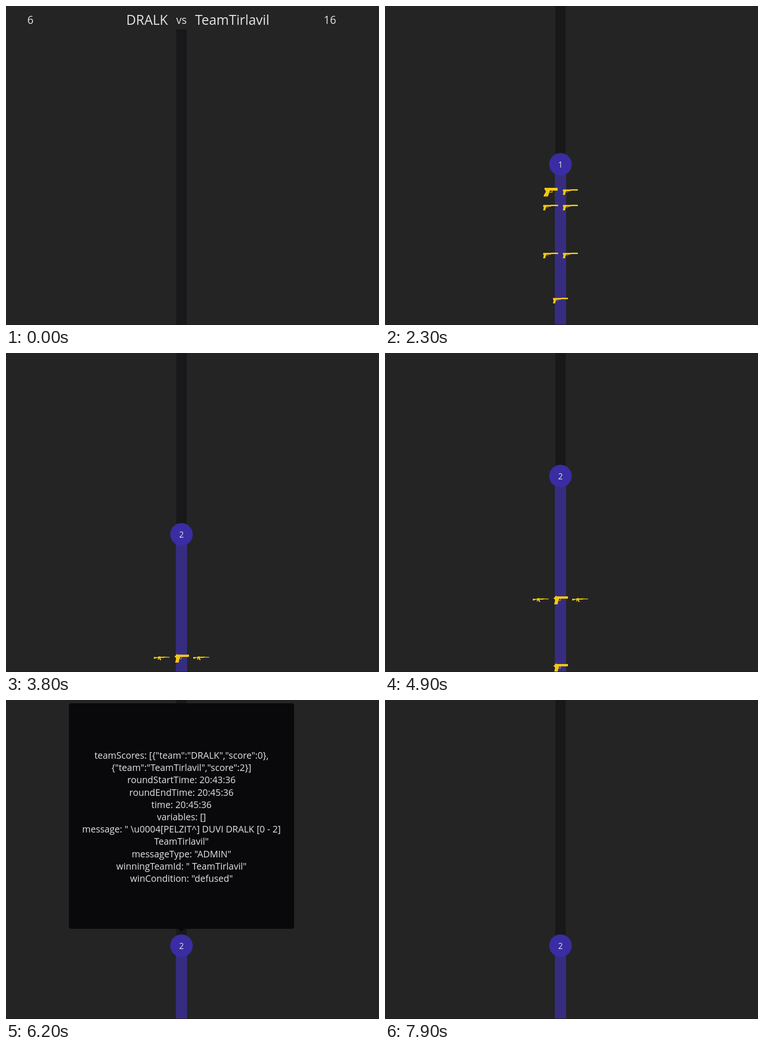
Animation of 795 by 679 pixels, one loop 8 s. Source, as an HTML page:

```html
<!DOCTYPE html>
<html lang="en">
<head>
<meta charset="utf-8">
<title>Match timeline</title>
<style>
  html, body { margin: 0; width: 100%; height: 100%; overflow: hidden; background: #242424; }
  svg { display: block; font-family: 'Open Sans', 'Noto Sans', sans-serif; fill: #e3e3e3; }
  .gun { fill: #f2c912; }
  .gun .guard { fill: none; stroke: #f2c912; }
</style>
</head>
<body>
<svg width="795" height="679" viewBox="0 0 795 679">
  <defs>
    <g id="silenced" class="gun">
      <path d="M0 1.5 1 .5H17V0H32V3H17V4H8L6 6 4.5 12H0L1.5 5 0 4Z"/>
      <path class="guard" stroke-width=".6" d="M6.5 6.3H11V4"/>
    </g>
    <g id="pistol" class="gun">
      <path d="M3 0H30.500L31 1V6H14.500L10.500 17.500 9 18.500H1.500L1 16.500 5.500 9 5.500 6 3 4Z"/>
      <path class="guard" stroke-width="1.3" d="M13.500 9.300H19.300V6"/>
    </g>
    <g id="heavy" class="gun">
      <path d="M4 1 6 0 8 1H31.500V5L30.500 6H13L11 10 9.500 18H2L4 10 3 7 0 4.500 3 3.500Z"/>
      <path class="guard" stroke-width="1" d="M11 10H15L16 6"/>
    </g>
    <g id="rifle" class="gun">
      <path d="M0 2 8 2.500 9 1.500 13 .500 14 1.500H22V.500L23 1.500 34 2V3.200H23L22 4H14L16 8.500 13.500 9 11.500 5 9.500 8 8 7.500 9.500 4.500 7 4 1 6 0 5.500Z"/>
    </g>
  </defs>
  <g id="page"></g>
  <g id="tip"></g>
  <rect y="678" width="795" height="1" fill="#1c191a"/>
</svg>
<script>
const LOOP = 8000, STEP = 100, CENTER = 374;
const HOME = 'DRALK', AWAY = 'TeamTirlavil';
const $ = id => document.getElementById(id);

// Scroll position and tooltip opacity as [time, value] points
const SCROLL = [
  [900, 0], [1000, 11], [1100, 150], [1600, 150], [1700, 297], [1800, 410], [1900, 450],
  [2100, 450], [2800, 1100], [3800, 1937], [3900, 1950], [4000, 2060], [4100, 2100],
  [4800, 2100], [4900, 2061], [5000, 1972], [5100, 1950], [5200, 1950], [5300, 1845], [5400, 1800]
];
const FADE = [[5900, 0], [6000, .2], [6100, .75], [6200, 1], [7600, 1], [7700, .8], [7800, .25], [7900, 0]];

// Round marker top, bar end and weapons as [shape, x, y]
const ROUNDS = [
  { top: 949, end: 1647, guns: [
    ['pistol', 337, 1023], ['silenced', 379, 1026],
    ['silenced', 337, 1059], ['silenced', 379, 1059],
    ['silenced', 337, 1161], ['silenced', 379, 1161],
    ['silenced', 358, 1257],
    ['pistol', 337, 1320], ['silenced', 379, 1323],
    ['pistol', 358, 1350]
  ] },
  { top: 2299, end: 3000, guns: [
    ['rifle', 315, 2582], ['heavy', 358.500, 2578], ['rifle', 399, 2582],
    ['heavy', 358.500, 2722]
  ] }
];

const DETAILS = [
  `teamScores: [{"team":"${HOME}","score":0},`,
  `{"team":"${AWAY}","score":2}]`,
  'roundStartTime: 20:43:36',
  'roundEndTime: 20:45:36',
  'time: 20:45:36',
  'variables: []',
  `message: " \\u0004[PELZIT^] DUVI ${HOME} [0 - 2]`,
  `${AWAY}"`,
  'messageType: "ADMIN"',
  `winningTeamId: " ${AWAY}"`,
  'winCondition: "defused"'
];

const text = (str, x, y, size, anchor = 'middle') =>
  `<text x="${x}" y="${y}" font-size="${size}" text-anchor="${anchor}">${str}</text>`;

const roundMarkup = ({ top, end, guns }, i) =>
  `<rect x="362" y="${top + 24}" width="24" height="${end - top - 24}" fill="#362d81"/>` +
  guns.map(([shape, x, y]) => `<use href="#${shape}" x="${x}" y="${y}"/>`).join('') +
  `<circle cx="${CENTER}" cy="${top + 24}" r="24" fill="#3a2ca3"/>` +
  text(i + 1, CENTER, top + 30.500, 17.500);

$('page').innerHTML =
  text('6', 52, 38, 23) + text('16', 690.500, 38, 23) + text('vs', CENTER, 38, 23) +
  text(HOME, 345, 40, 28.500, 'end') + text(AWAY, 403, 40, 28.500, 'start') +
  '<rect x="363" y="50" width="22" height="3000" fill="#18181a"/>' +
  ROUNDS.map(roundMarkup).join('');

$('tip').innerHTML =
  '<rect x="134" y="7" width="480" height="480" rx="5" fill="#09090b"/>' +
  '<path d="M368 487H380L374 493Z" fill="#09090b"/>' +
  DETAILS.map((line, i) => text(line, CENTER, 125 + i * 26.200, 19.500)).join('');

function valueAt(points, t) {
  const next = points.findIndex(p => p[0] >= t);
  if (next < 0) return points[points.length - 1][1];
  if (next === 0) return points[0][1];
  const [t0, v0] = points[next - 1], [t1, v1] = points[next];
  return v0 + (v1 - v0) * (t - t0) / (t1 - t0);
}

function draw(ms) {
  const t = Math.floor(ms % LOOP / STEP) * STEP;
  $('page').setAttribute('transform', `translate(0 ${-Math.round(valueAt(SCROLL, t))})`);
  $('tip').setAttribute('opacity', valueAt(FADE, t));
}

const start = performance.now();
function tick() {
  draw(performance.now() - start);
  requestAnimationFrame(tick);
}
tick();
</script>
</body>
</html>
```
